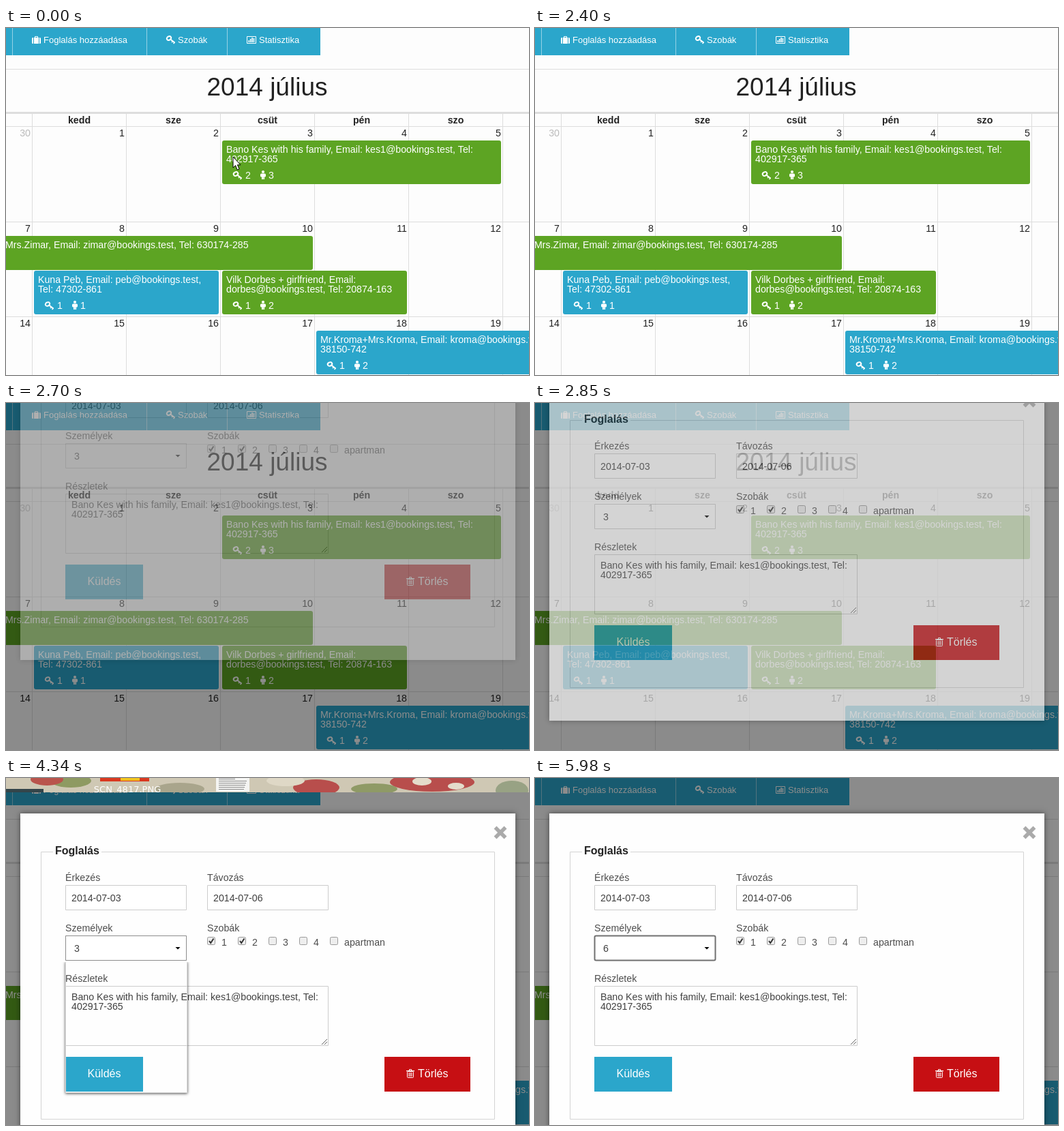
Animation, 767 px wide and 509 px high, one loop 8 s. Source, as an HTML page with a canvas:

```html
<!DOCTYPE html>
<html lang="hu">
<head>
<meta charset="utf-8">
<title>Foglalás</title>
<style>
  html, body { margin: 0; width: 100%; height: 100%; overflow: hidden; background: #fdfdfd; }
  canvas { position: absolute; left: 0; top: 0; }
</style>
</head>
<body>
<canvas id="page" width="767" height="509"></canvas>
<canvas id="dialog" width="767" height="570"></canvas>
<script>
const LOOP = 8000;
const BLUE = '#2ba6cb', GREEN = '#5da423', RED = '#c60f13', LINE = '#dddddd', FIELD = '#cccccc';
const SANS = '"Liberation Sans", Arial, sans-serif';
const BODY = '14.2px ' + SANS, BUTTON = '16px ' + SANS;

const dialogCanvas = document.getElementById('dialog');
const page = document.getElementById('page').getContext('2d');
const dialog = dialogCanvas.getContext('2d');
let g = page;

// Each row is [start time, ...values]; the latest row that has started applies.
const cursorSteps = [[0, 333, 189], [900, 384, 189], [1050, 476, 189], [1200, 506, 189],
  [1350, 510, 195], [1500, 512, 203], [1650, 513, 203], [2250]];
const dialogSteps = [[0, 0, 0], [2700, -172, .3], [2850, -83, .63], [2990, 0, 1]];
const hoverSteps = [[4490, 3], [4640, 2], [4940, 4], [5090, 5], [5380, 6]];
const stepAt = (steps, t) => steps.filter(s => s[0] <= t).pop();

function rect(x, y, w, h, color) {
  g.fillStyle = color;
  g.fillRect(x, y, w, h);
}

function frame(x, y, w, h, color, radius = 0, width = 1) {
  g.strokeStyle = color;
  g.lineWidth = width;
  g.beginPath();
  g.roundRect(x + .5, y + .5, w - 1, h - 1, radius);
  g.stroke();
}

function rounded(x, y, w, h, r, color) {
  g.fillStyle = color;
  g.beginPath();
  g.roundRect(x, y, w, h, r);
  g.fill();
}

function text(str, x, y, color = '#fff', font = BODY, align = 'left') {
  g.font = font;
  g.fillStyle = color;
  g.textAlign = align;
  g.fillText(str, x, y);
}

function path(points, color, width) {
  g.strokeStyle = color;
  g.lineWidth = width;
  g.beginPath();
  points.forEach(([x, y]) => g.lineTo(x, y));
  g.stroke();
}

function ellipse(x, y, rx, ry, color) {
  g.fillStyle = color;
  g.beginPath();
  g.ellipse(x, y, rx, ry, 0, 0, 7);
  g.fill();
}

function keyIcon(x, y) {
  g.strokeStyle = '#fff';
  g.lineWidth = 2;
  g.beginPath();
  g.ellipse(x + 4, y + 4, 3.4, 2.6, -.5, 0, 7);
  g.stroke();
  path([[x + 6, y + 5.5], [x + 12.5, y + 10.5]], '#fff', 2);
  path([[x + 8, y + 10], [x + 10, y + 8]], '#fff', 1.6);
  path([[x + 10.5, y + 12], [x + 12.5, y + 10]], '#fff', 1.6);
}

function personIcon(x, y) {
  ellipse(x + 4, y + 2, 2.1, 2.1, '#fff');
  rounded(x, y + 4.5, 8, 5, 1.5, '#fff');
  rect(x + 2, y + 6, 1.8, 7, '#fff');
  rect(x + 4.3, y + 6, 1.8, 7, '#fff');
}

function caseIcon(x, y) {
  rounded(x, y + 2, 13, 9, 1.5, '#fff');
  frame(x + 4, y, 5, 4, '#fff');
  rect(x + 2, y + 2, 1, 9, BLUE);
  rect(x + 10, y + 2, 1, 9, BLUE);
}

function chartIcon(x, y) {
  frame(x, y, 14, 11, '#fff');
  [3, 5, 7, 6].forEach((h, i) => rect(x + 2.5 + i * 2.4, y + 9 - h, 1.6, h, '#fff'));
}

function trashIcon(x, y) {
  frame(x + 1, y + 3, 10, 10, '#fff', 1);
  rect(x, y + 2, 12, 1.3, '#fff');
  frame(x + 4, y, 4, 3, '#fff');
  [3.5, 5.5, 7.5].forEach(dx => rect(x + dx, y + 5, 1, 6, '#fff'));
}

function booking(x, y, w, color, lines, rooms, people) {
  rounded(x, y, w, 64, 3, color);
  lines.forEach((line, i) => text(line, x + 6, y + 18 + i * 14));
  keyIcon(x + 16, y + 45);
  text(rooms, x + 34, y + 56);
  personIcon(x + 56, y + 44);
  text(people, x + 68, y + 56);
}

const GUEST = ['Bano Kes with his family, Email: kes1@bookings.test, Tel:', '402917-365'];

function drawCalendar() {
  rect(0, 0, 767, 509, '#fdfdfd');
  rect(0, 0, 461, 40, BLUE);
  [9, 206, 324].forEach(x => rect(x, 0, 1, 40, '#95d2e5'));
  caseIcon(38, 12);
  keyIcon(235, 11);
  chartIcon(353, 12);
  [['Foglalás hozzáadása', 55], ['Szobák', 252], ['Statisztika', 371]]
    .forEach(([label, x]) => text(label, x, 22, '#fff', '13px ' + SANS));

  rect(0, 60, 767, 1, LINE);
  text('2014 július', 383, 99, '#222', '37px ' + SANS, 'center');
  rect(0, 123, 767, 3, LINE);
  [144, 284, 423].forEach(y => rect(0, y, 767, 1, LINE));
  for (let i = 0; i < 6; i++) {
    const x = 38 + i * 138;
    rect(x, 126, 1, 383, LINE);
    text(['', 'kedd', 'sze', 'csüt', 'pén', 'szo'][i], x - 68.5, 140, '#222', 'bold ' + BODY, 'center');
    text(i || 30, x - 2, 159, i ? '#222' : '#bbb', BODY, 'right');
    text(7 + i, x - 2, 299, '#222', BODY, 'right');
    text(14 + i, x - 2, 438, '#222', BODY, 'right');
  }

  booking(317, 165, 409, GREEN, GUEST, 2, 3);
  rounded(-10, 305, 460, 50, 3, GREEN);
  text('Mrs.Zimar, Email: zimar@bookings.test, Tel: 630174-285', -1, 323);
  booking(41, 356, 271, BLUE, ['Kuna Peb, Email: peb@bookings.test,', 'Tel: 47302-861'], 1, 1);
  booking(317, 356, 271, GREEN, ['Vilk Dorbes + girlfriend, Email:', 'dorbes@bookings.test, Tel: 20874-163'], 1, 2);
  booking(455, 444, 400, BLUE, ['Mr.Kroma+Mrs.Kroma, Email: kroma@bookings.test, Tel:', '38150-742'], 1, 2);
}

function drawCursor(x, y) {
  g.save();
  g.translate(x, y);
  g.beginPath();
  [[0, 0], [0, 16], [3.6, 12.6], [6.2, 19], [9, 17.8], [6.4, 11.8], [11, 11.8]]
    .forEach(([px, py]) => g.lineTo(px, py));
  g.closePath();
  g.fillStyle = '#fff';
  g.fill();
  g.strokeStyle = '#000';
  g.lineWidth = 1;
  g.stroke();
  g.restore();
}

// Sliver of desktop that flashes along the top edge.
function drawDesktop() {
  g.save();
  g.beginPath();
  g.rect(0, 0, 767, 21);
  g.clip();
  rect(0, 0, 767, 21, '#cfc8b4');
  [[95, 4, 30, 10, '#8e9a62'], [60, 2, 24, 9, '#b9544c'], [255, 16, 36, 9, '#a9a58c'],
   [455, 14, 34, 12, '#b84e4c'], [410, 4, 28, 8, '#dfd8c6'], [540, 16, 34, 8, '#8f9a66'],
   [625, 6, 62, 14, '#b84e4c'], [610, 5, 14, 6, '#e4dccb'], [660, 12, 12, 5, '#e4dccb'],
   [742, 18, 24, 14, '#98a284']].forEach(e => ellipse(...e));
  rect(0, 16, 55, 5, '#34454a');
  rect(138, 0, 72, 5, '#d9381f');
  rect(168, 0, 28, 4, '#f2c21c');
  rect(308, 0, 49, 20, '#f4f4f2');
  for (let i = 0; i < 6; i++) rect(312, 1 + i * 3, 24 + i * 17 % 18, 1, '#888');
  text('SCN_4817.PNG', 178, 21, '#fff', '13px "DejaVu Sans", sans-serif', 'center');
  g.restore();
}

function field(label, value, x, y) {
  text(label, x, y, '#4d4d4d');
  rect(x, y + 6, 178, 37, '#fff');
  frame(x, y + 6, 178, 37, FIELD);
  text(value, x + 9, y + 30, '#404040');
}

function checkbox(label, x, checked) {
  rounded(x, 233, 12, 12, 2, '#eeeeee');
  frame(x, 233, 12, 12, '#9a9a9a', 2);
  if (checked) path([[x + 3, 239], [x + 5.2, 242], [x + 9.5, 235.5]], '#333', 2);
  text(label, x + 21, 246, '#4d4d4d');
}

function withShadow(blur, offset, color, draw) {
  g.save();
  g.shadowBlur = blur;
  g.shadowOffsetY = offset;
  g.shadowColor = color;
  draw();
  g.restore();
}

function drawList(hover) {
  withShadow(4, 1, 'rgba(0,0,0,.6)', () => rect(87, 269, 178, 193, '#fff'));
  frame(87, 268, 178, 194, '#b5b5b5');
  for (let n = 1; n <= 12; n++) {
    const y = 253 + n * 16;
    if (n === hover) rect(88, y, 176, 16, '#4f8fd8');
    text(n, 100, y + 13, n === hover ? '#fff' : '#404040');
  }
}

// Empty list: only its shadow shows while the popup opens.
function drawListOutline() {
  g.save();
  g.beginPath();
  g.rect(80, 270, 195, 200);
  g.rect(88, 270, 177, 191);
  g.clip('evenodd');
  withShadow(4, 1, 'rgba(0,0,0,.7)', () => rect(87, 269, 179, 193, '#d8d8d8'));
  g.restore();
}

function drawDialog(t) {
  g.clearRect(0, 0, 767, 570);
  withShadow(8, 0, 'rgba(0,0,0,.5)', () => rect(21, 52, 726, 497, '#fefefe'));
  path([[717.5, 72.5], [732.5, 87.5]], '#aaa', 5.5);
  path([[732.5, 72.5], [717.5, 87.5]], '#aaa', 5.5);

  frame(51, 108, 666, 393, '#d4d4d4');
  rect(69, 106, 71, 5, '#fefefe');
  text('Foglalás', 72, 112, '#222', 'bold ' + BUTTON);

  field('Érkezés', '2014-07-03', 87, 151);
  field('Távozás', '2014-07-06', 295, 151);

  field('Személyek', '', 87, 225);
  if (t >= 4490) frame(87, 231, 178, 37, '#707070', 2, 2);
  else if (t >= 4340) frame(87, 231, 178, 37, '#8c8c8c');
  text(t < 5980 ? 3 : 6, 100, 255, '#404040');
  g.fillStyle = '#000';
  g.beginPath();
  [[248.5, 248], [255.5, 248], [252, 251.5]].forEach(p => g.lineTo(...p));
  g.fill();

  text('Szobák', 295, 225, '#4d4d4d');
  [1, 2, 3, 4, 'apartman'].forEach((room, i) => checkbox(room, 295 + i * 45, i < 2));

  text('Részletek', 87, 299, '#4d4d4d');
  frame(87, 305, 386, 88, FIELD);
  GUEST.forEach((line, i) => text(line, 96, 326 + i * 14, '#404040'));
  path([[463, 391], [471, 383]], '#666', 1);
  path([[467, 391], [471, 387]], '#666', 1);

  rect(87, 409, 114, 51, BLUE);
  text('Küldés', 144, 439, '#fff', BUTTON, 'center');
  rect(555, 409, 126, 51, RED);
  trashIcon(587, 427);
  text('Törlés', 604, 439, '#fff', BUTTON);

  if (t >= 4340 && t < 4490) drawListOutline();
  if (t >= 4490 && t < 5980) drawList(stepAt(hoverSteps, t)[1]);
}

function render(now) {
  const t = now % LOOP;
  g = page;
  drawCalendar();
  const [, cx, cy] = stepAt(cursorSteps, t);
  if (cx) drawCursor(cx, cy);
  if (t >= 2550) rect(0, 0, 767, 509, 'rgba(0,0,0,.45)');
  if (t >= 4340 && t < 4490) drawDesktop();

  g = dialog;
  drawDialog(t);
  const [, offset, opacity] = stepAt(dialogSteps, t);
  dialogCanvas.style.opacity = opacity;
  dialogCanvas.style.transform = `translateY(${offset}px)`;
  requestAnimationFrame(render);
}
requestAnimationFrame(render);
</script>
</body>
</html>
```
